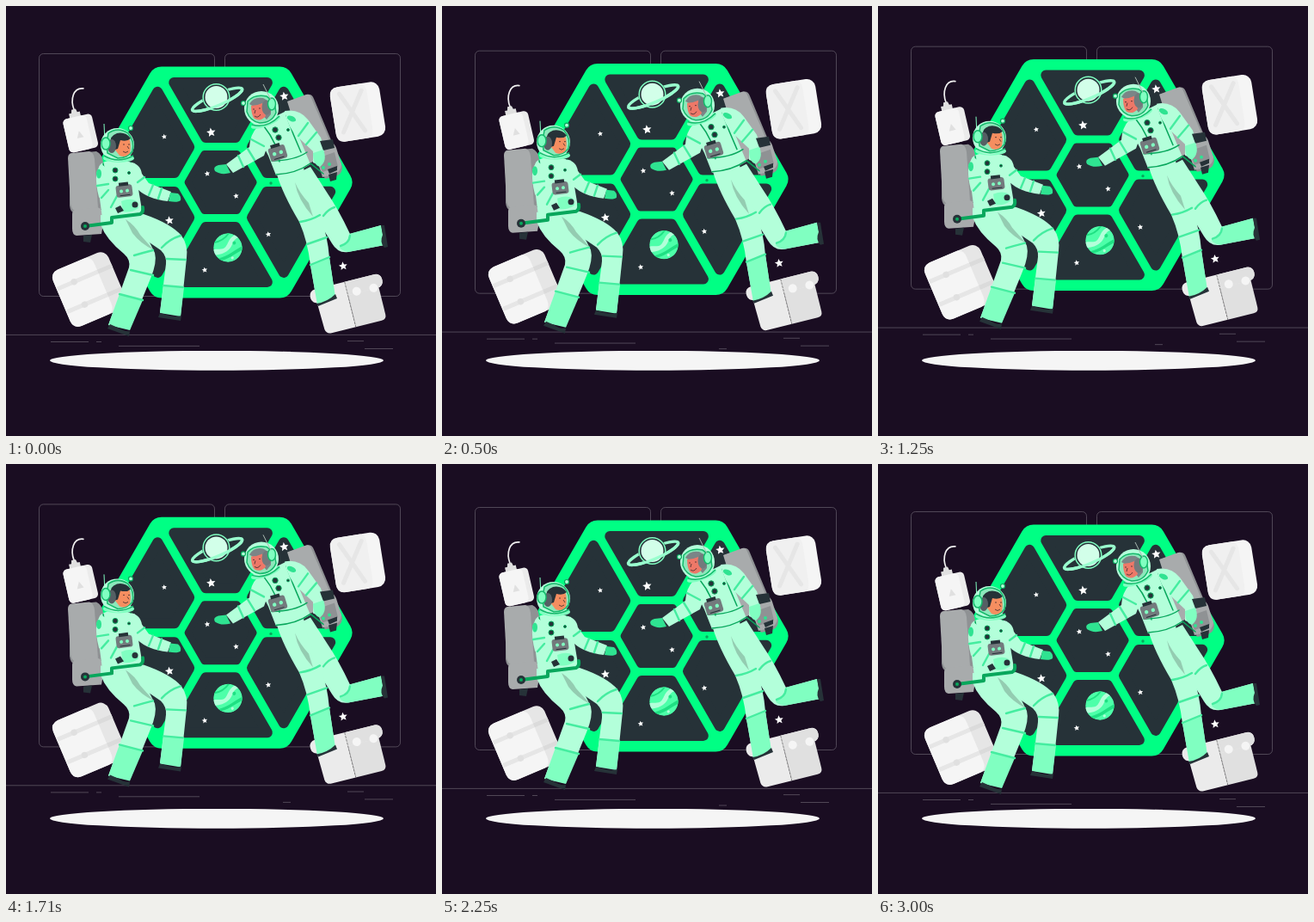
Recreate the animation shown at these times as an HTML page. Size 500 px wide and 500 px high, loop 3040 ms.

```html
<!DOCTYPE html>
<html lang="en">
<head>
<meta charset="utf-8">
<title>Floating astronauts</title>
<style>
html, body { margin: 0; width: 100%; height: 100%; overflow: hidden; background: #1a0d22; }
svg { display: block; width: 100%; height: 100%; }
.line { fill: none; stroke: #67616e; stroke-width: .7; }
.pane { fill: #263238; stroke: #263238; stroke-linejoin: round; }
.suit { fill: #b3ffda; }
.boot { fill: #80ffc1; }
.glove { fill: #2fe391; }
.band { fill: none; stroke: #45eda0; stroke-width: 2.4; stroke-linecap: round; }
.strap { fill: none; stroke: #08a75c; stroke-width: 1.5; stroke-linecap: round; stroke-linejoin: round; }
.fold { fill: #94ccb1; }
.dark { fill: #263238; }
.pack { fill: #a8abac; }
.pack2 { fill: #8f9294; }
.skin { fill: #f58e60; }
.p1 { fill: #f5f5f5; } .p2 { fill: #ebebeb; } .p3 { fill: #e0e0e0; }
.mark { fill: none; stroke: #e6e6e6; stroke-width: 5; }
.rim { stroke: #14b96b; stroke-width: 1.5; }
.ink { fill: none; stroke: #3d292c; stroke-width: .8; }
</style>
</head>
<body>
<svg viewBox="0 0 500 500">
<defs>
  <clipPath id="disc"><circle r="16.7"/></clipPath>
</defs>
<g id="scene">
  <!-- room -->
  <g class="line">
    <rect x="38.5" y="55.5" width="204" height="282" rx="5"/>
    <rect x="254.5" y="55.5" width="204" height="282" rx="5"/>
    <path d="M0 382.4H500M52 390.5H96M105 390.5h6M131 395.4h94M322 402h9M397 389.6h19M417 398.5h33"/>
  </g>

  <!-- window -->
  <g id="window" transform="translate(249.6 204.9)">
    <path d="M-68.7-119H68.7L137.4 0 68.7 119H-68.7L-137.4 0Z" fill="#00ff84" stroke="#00ff84" stroke-width="31" stroke-linejoin="round"/>
    <path class="pane" stroke-width="8" d="M-19-33H19L38 0 19 33H-19L-38 0Z"/>
  </g>
  <g transform="translate(244.5 106)">
    <ellipse cx="0" cy="3" rx="31.500" ry="6.500" transform="rotate(-23)" fill="none" stroke="#99ffce" stroke-width="3.400"/>
    <circle r="16.300" class="dark"/>
    <circle r="15.300" fill="none" stroke="#80ffc1" stroke-width="1.500"/>
    <circle r="13" fill="#d2ffe9"/>
    <path transform="rotate(-23)" d="M-31.500 3C-28 12 28 12 31.500 3" fill="none" stroke="#99ffce" stroke-width="3.400"/>
  </g>
  <g transform="translate(258 281) rotate(-24)" clip-path="url(#disc)">
    <circle r="17" fill="#4dffa9"/>
    <path d="M-20-5C-12-6-8 1-2-2S4-10 18-11V-6C9-7 8-2 3 1S-9 5-20 1Z" fill="#b3ffda"/>
    <path d="M-18 6C-7 10 3 6 18 5V9C5 9-4 13-17 10Z" fill="#1fe083"/>
    <path d="M-12-12Q-2-9 8-15" fill="none" stroke="#1fe083" stroke-width="2"/>
    <circle cx="9" cy="-2" r="2" fill="#1fe083"/><circle cx="0" cy="13" r="1.600" fill="#b3ffda"/>
  </g>

  <!-- loose cargo -->
  <g transform="translate(409 123) rotate(-9)">
    <rect class="p1" x="-29" y="-32" width="58" height="64" rx="10"/>
    <path fill="#f0f0f0" d="M-19-32H8Q14-30 14-22V22Q14 30 8 32H-19Q-29 32-29 22V-22Q-29-32-19-32Z"/>
    <path class="mark" d="M-18-24 5 23M8-24-20 21" stroke-linecap="round"/>
  </g>
  <g transform="translate(97 329.500) rotate(-23)">
    <rect fill="#e6e6e6" x="-35" y="-35.500" width="70" height="71" rx="10"/>
    <path class="p1" d="M-25-35.500H10Q17-34 17-25V25Q17 34 10 35.500H-25Q-35 35-35 25V-25Q-35-35-25-35.500Z"/>
    <path class="mark" d="M-34-15H17M-34 14H17"/>
    <path class="mark" d="M17-15H35M17 14H35" style="stroke:#dbdbdb"/>
    <circle class="p3" cx="-13" cy="-15" r="3.700"/><circle class="p3" cx="-12" cy="14" r="3.700"/>
  </g>
  <g transform="translate(86.500 148) rotate(-13)">
    <path d="M-1-28C-3-41 4-54 15-50" fill="none" stroke="#f0f0f0" stroke-width="1.700" stroke-linecap="round"/>
    <path class="p3" d="M-4-29H1L2-25H5V-18H-8V-25H-5Z"/>
    <rect class="p2" x="-17" y="-20" width="34.500" height="40" rx="5"/>
    <rect class="p1" x="-17" y="-20" width="28" height="40" rx="5"/>
    <path class="p3" d="M-1-3 3 5H-5Z"/>
  </g>
  <g transform="translate(400 346) rotate(-14)">
    <path class="p2" d="M-37-12H0V28H-29Q-35 28-36 22Z"/>
    <path class="p3" d="M0-12H37V22Q37 28 31 28H0Z"/>
    <rect class="p2" x="-43" y="-26" width="86" height="16" rx="7"/>
    <path class="p3" d="M0-26H36Q43-25 43-18T36-10H0Z"/>
    <circle class="p1" cx="11" cy="-12" r="5"/><circle class="p1" cx="31" cy="-11" r="5"/>
    <path d="M0-26V28" fill="none" stroke="#777" stroke-width=".8" stroke-dasharray="3 1"/>
  </g>

  <!-- left astronaut -->
  <g>
    <path class="pack2" d="M74 172 105 169Q112 172 113 182L116 236 79 240Q75 240 74 232Z"/>
    <path class="pack" d="M76 171 97 169Q102 170 103 178L107 235 81 238Q76 237 75 230L72 177Q72 172 76 171Z"/>
    <path class="pack" d="M80 237 106 234Q114 236 114 247L111 265 82 267Q77 266 77 259V242Q77 238 80 237Z"/>
    <path class="dark" d="M90 267 100 266 98 275 90 274Z"/>

    <path class="suit" d="M110 243 150 245Q164 268 173 287 176 298 168 317L144 376 119 371 143 304Q145 295 137 288 116 271 110 254Z"/>
    <path class="boot" d="M132 335 159 342 144 377 119 371Z"/>
    <path class="suit" d="M125 247 160 242Q192 253 204 267 212 278 210 293L203 360 179 356 186 300Q187 291 180 284L152 265Q133 258 125 247Z"/>
    <path class="boot" d="M183 325 207 327 203 361 179 357Z"/>
    <path class="fold" d="M139 248Q150 255 156 266L172 284Q156 276 147 264Z"/>
    <path class="band" d="M149 290Q159 287 171 284M145 307 171 313M132 335 159 342M187 294 209 295M183 325 206 327M181 281Q190 271 203 267"/>
    <path class="dark" d="M121 370 130 374Q137 379 144 378L143 384 118 375ZM179 357 190 360Q198 362 204 360L203 366 177 362Z"/>

    <path class="suit" d="M111 183Q120 178 136 179L150 183Q156 194 154 213L159 243Q137 252 112 247L106 201Q106 187 111 183Z"/>
    <path class="strap" d="M113 183Q117 204 115 222M145 182Q149 193 150 207"/>
    <path class="suit" d="M144 182Q156 183 158 195L166 206 192 216 188 227Q164 224 153 213 146 205 144 195Z"/>
    <path class="band" d="M153 205 161 199M166 220 171 208M177 224 181 212"/>
    <path class="glove" d="M191 217 200 218Q204 221 203 226 200 229 189 227Z"/>

    <path class="strap" d="M92 256 123 252V246L156 242Q160 240 159 234" style="stroke-width:4"/>
    <circle class="dark" cx="92" cy="256" r="5"/><circle cx="92" cy="256" r="2" fill="#08a75c"/>

    <path class="suit" d="M110 184Q119 187 120 199L119 211 140 226 134 240Q116 235 108 222 104 207 105 194Z"/>
    <ellipse class="glove" cx="108" cy="195" rx="3" ry="5.500"/>
    <path class="band" d="M106 209 119 207M111 223 119 214M122 234 129 221"/>
    <path class="boot" d="M134 227Q146 222 153 228L154 235Q145 241 136 239Z"/>
    <path class="dark" d="M127 235 133 232 137 238 130 241Z"/>
    <circle class="dark" cx="150" cy="231" r="3.500"/>

    <g class="dark" stroke="#08a75c" stroke-width="1">
      <circle cx="127" cy="191" r="3"/><circle cx="127" cy="201" r="3"/><circle cx="143" cy="194" r="1.500"/>
    </g>
    <g transform="translate(138 215) rotate(-7)">
      <rect x="-10" y="-7" width="19" height="14" rx="3" fill="#737a7d"/>
      <path class="dark" d="M-6-10H5V-6H-6Z"/>
      <circle class="boot" cx="-4" r="2"/><circle class="boot" cx="3" r="2"/>
      <path d="M-6 5H6" stroke="#263238"/>
    </g>

    <path d="M115 160 114 137" stroke="#80ffc1" stroke-width="1"/>
    <ellipse class="boot" cx="131" cy="177" rx="18" ry="5"/>
    <circle cx="145" cy="142" r="2.500" fill="#b3ffda" stroke="#08a75c" stroke-width="1.200"/>
    <circle class="suit" cx="129.500" cy="161.500" r="19.500"/>
    <path class="rim" d="M119 148Q130 140 142 148 150 157 147 169 141 177 130 177L118 171 117 160Z" fill="#8ce8bb"/>
    <path class="skin" d="M127 153H143Q146 162 144 171 139 177 132 174L126 166Z"/>
    <path class="dark" d="M122 160Q120 151 129 148 139 146 145 154 141 158 133 156L130 166 124 168Z"/>
    <path class="ink" d="M136 161h2M142 161h2M136 169Q139 172 142 169M141 163l2 3"/>
    <ellipse cx="123" cy="163" rx="5" ry="8" fill="#555f64"/>
    <ellipse class="rim" cx="116" cy="160" rx="5" ry="7" fill="#80ffc1"/>
    <path class="rim" d="M114 174Q130 184 148 174" fill="none"/>
  </g>

  <!-- right astronaut -->
  <g>
    <path class="pack2" d="M328 111 350 103Q356 102 358 108L391 187Q391 195 384 198L371 201Z"/>
    <path class="pack" d="M327 111 349 103Q353 102 355 107L382 170 350 184Z"/>
    <path class="pack" d="M358 167 378 158Q382 160 384 165L390 184Q390 193 380 196L368 199Z"/>
    <path class="dark" d="M375 196 385 193 384 202 377 204Z"/>

    <path class="suit" d="M336 196 354 187 372 215Q387 237 400 265L436 255 440 278 398 286Q386 288 379 276L352 232Z"/>
    <path class="boot" d="M399 265 436 255 440 278 398 286Q388 284 388 280Q399 277 399 265Z"/>
    <path class="suit" d="M315 196 346 188Q350 213 365 244 374 266 376 293L383 339 362 347 354 302Q351 274 341 251 322 219 315 196Z"/>
    <path class="boot" d="M354 301 376 292 383 339 362 347Z"/>
    <path class="fold" d="M336 205Q339 225 357 245L352 229Q341 217 336 205Z"/>
    <path class="band" d="M342 251Q355 249 365 243M350 277 373 269M354 301 376 292M369 244Q375 236 382 234M389 279Q399 276 400 267"/>
    <path class="dark" d="M361 346Q374 344 383 335L385 340 363 349ZM436 255 440 255 444 280 440 281Q434 275 438 266Z"/>

    <path class="suit" d="M290 145Q304 132 326 122 337 127 338 146L354 184Q336 196 314 197L305 174Z"/>
    <path class="strap" d="M300 140Q316 160 318 181M326 127Q333 148 343 170M314 196Q337 195 354 183L369 195M309 180Q335 180 350 170"/>
    <path class="suit" d="M292 141Q305 143 306 157L300 174 264 194 256 184 283 164Q284 149 292 141Z"/>
    <path class="band" d="M285 155 300 163M281 166 289 179M270 174 276 187"/>
    <path class="glove" d="M256 184 247 185Q240 187 243 192 250 197 261 194Z"/>

    <path class="suit" d="M324 122Q341 119 351 132L366 153Q373 170 367 186L357 182 357 169 339 152Q328 142 324 122Z"/>
    <ellipse class="glove" cx="332" cy="131" rx="5.500" ry="3" transform="rotate(25 332 131)"/>
    <path class="band" d="M340 151 351 136M349 161 361 147"/>
    <path class="dark" d="M365 157 380 155 382 165 369 168Z"/>
    <path class="pack2" d="M362 177 382 170 386 187 368 193Z"/>
    <path class="boot" d="M357 171 369 167Q374 180 365 187 357 185 357 171Z"/>
    <path class="dark" d="M374 190 385 186V191L376 195Z"/>
    <circle class="glove" cx="376" cy="184" r="2"/><circle class="glove" cx="369" cy="188" r="2"/>

    <g class="dark" stroke="#08a75c" stroke-width="1">
      <circle cx="313" cy="144" r="3.200"/><circle cx="317" cy="153" r="3.200"/><circle cx="328" cy="144" r="1.500"/>
    </g>
    <g transform="translate(316 171) rotate(-17)">
      <rect x="-10" y="-8" width="20" height="16" rx="3" fill="#737a7d"/>
      <path class="dark" d="M-6-11H5V-7H-6Z"/>
      <circle class="boot" cx="-4" r="2.200"/><circle class="boot" cx="4" r="2.200"/>
      <path d="M-6 6H6" stroke="#263238"/>
    </g>
    <circle cx="308" cy="206" r="1.700" fill="#08a75c"/>

    <ellipse class="boot" cx="302" cy="135" rx="18" ry="5" transform="rotate(-20 302 135)"/>
    <circle class="suit" cx="297" cy="119" r="20"/>
    <path class="rim" d="M281 111Q289 102 303 105 313 111 314 124 309 136 295 136 284 134 280 123Z" fill="#8ce8bb"/>
    <path d="M283 114Q288 105 299 107 309 111 308 126L303 132 292 119Z" fill="#7b8587"/>
    <path class="skin" style="fill:#ee7868" d="M285 116Q292 116 298 113L302 128Q296 135 289 131 285 127 285 116Z"/>
    <path class="ink" d="M287 120h2M294 119h2M289 128Q293 131 296 126M290 121l-1 4"/>
    <ellipse cx="303" cy="118" rx="5.500" ry="8.500" fill="#737a7d"/>
    <ellipse class="rim" cx="309" cy="114" rx="4.500" ry="7" fill="#80ffc1"/>
    <path d="M308 109 299 91" stroke="#a9b8b0" stroke-width="1"/>
    <circle cx="276" cy="113" r="2.500" fill="#b3ffda" stroke="#08a75c" stroke-width="1.200"/>
    <path class="rim" d="M286 138Q303 143 318 128" fill="none"/>
  </g>
</g>
<ellipse class="p1" cx="245" cy="412.300" rx="194" ry="11.400"/>
</svg>
<script>
const scene = document.getElementById('scene');
const frame = document.getElementById('window');

function add(parent, tag, attrs) {
  const el = document.createElementNS('http://www.w3.org/2000/svg', tag);
  for (const key in attrs) el.setAttribute(key, attrs[key]);
  parent.appendChild(el);
}

for (let angle = 0; angle < 360; angle += 60) {
  add(frame, 'path', {
    class: 'pane', 'stroke-width': 12, transform: `rotate(${angle})`,
    d: 'M-54.3-116H54.3L17.3-52H-17.3Z'
  });
}

function star(x, y, radius) {
  const points = Array.from({ length: 10 }, (_, i) => {
    const r = i % 2 ? radius * .46 : radius;
    const a = i * Math.PI / 5 - Math.PI / 2 - .15;
    return `${x + r * Math.cos(a)},${y + r * Math.sin(a)}`;
  });
  add(scene, 'polygon', { points: points.join(' '), fill: '#fff' });
}

[[184, 152, 3.2], [238.5, 147, 5.5], [234, 195, 3.4], [267.5, 221, 3.4], [190, 249.5, 5.2],
 [231, 307, 3.4], [305, 265.5, 3.4], [392, 302.5, 5.2], [323.5, 105, 5.4]].forEach(s => star(...s));

// Linear bob, 10 units up and back in 3 s, stepped at 24 fps, with a short rest.
function draw(now) {
  const step = Math.min(72, Math.floor(now % 3040 * .024 + .1));
  const y = -10 * (1 - Math.abs(1 - step / 36));
  scene.setAttribute('transform', `translate(0 ${y})`);
  requestAnimationFrame(draw);
}
requestAnimationFrame(draw);
</script>
</body>
</html>
```
